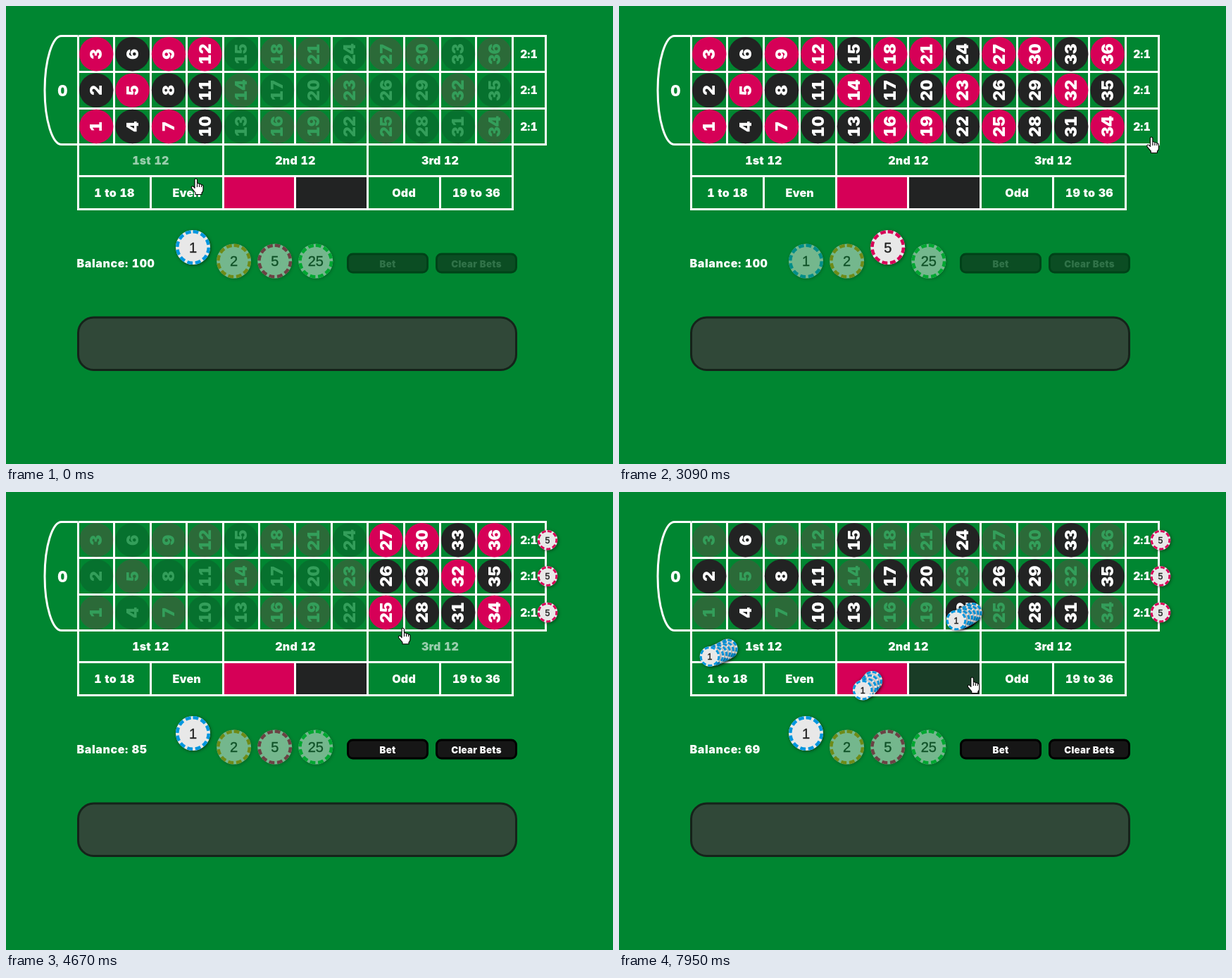
An HTML page for the animation above (8 s loop, 862 px wide and 650 px high).

```html
<!DOCTYPE html>
<html lang="en">
<head>
<meta charset="utf-8">
<title>Roulette table</title>
<style>
html, body { margin: 0; width: 100%; height: 100%; overflow: hidden; background: #008631; }
svg { display: block; width: 862px; height: 650px; }
text { fill: #fff; font-family: "Arial Black", Inter, "Open Sans", sans-serif; font-weight: 900;
  font-feature-settings: "tnum"; letter-spacing: .2px; }
.balance { letter-spacing: .6px; }
.chip { filter: drop-shadow(1px 1px 2px rgba(0, 0, 0, .5)); }
.chip text { fill: #222; stroke: #222; stroke-width: .4; letter-spacing: 0;
  font-family: "Liberation Sans", Arial, sans-serif; font-weight: 400; }
.line { fill: none; stroke: #fff; stroke-width: 3; }
.grid { shape-rendering: crispEdges; }
</style>
</head>
<body>
<svg id="stage" viewBox="0 0 862 650"></svg>
<script>
const LOOP = 8000, HOVER_LAG = 50, RISE = 120;
const RED = '#d60057', BLACK = '#222323';
const COLORS = { 1: '#0096df', 2: '#dc9100', 5: RED, 25: '#00c832' };
const LEFT = 102.5, TOP = 42.5, STEP = 51.4, RIGHT = LEFT + 12 * STEP;
const BOTTOM = 196.5, MIDDLE = 241.5, END = 288;
const DOZENS = ['1st', '2nd', '3rd'];
const SIDES = ['low', 'even', 'red', 'black', 'odd', 'high'];
const SIDE_TEXT = { low: '1 to 18', even: 'Even', odd: 'Odd', high: '19 to 36' };
const stage = document.getElementById('stage');

const isRed = n => n % 2 === ((n - 1) % 18 < 10 ? 1 : 0);
const colX = i => LEFT + i * STEP;
const rowY = r => 171 - r * STEP;
const trayX = i => 265.5 + 58.1 * i;
const scatter = i => Math.sin(i * 12.9 + 1) * 1.5;

function el(name, attrs = {}, parent = stage) {
  const node = document.createElementNS('http://www.w3.org/2000/svg', name);
  for (const key in attrs) node.setAttribute(key, attrs[key]);
  return parent.appendChild(node);
}
function label(str, x, y, size, parent = stage, attrs = {}) {
  const node = el('text', { x, y: y + size * .36, 'font-size': size, 'text-anchor': 'middle', ...attrs }, parent);
  node.textContent = str;
  return node;
}
function chip(value, x, y, r, parent, turn = 0) {
  const big = r > 20, w = big ? 4.5 : 3, ring = r - w / 2;
  const step = 2 * Math.PI * ring / (big ? 12 : 9);
  const g = el('g', { class: 'chip', transform: `translate(${x} ${y})` }, parent);
  el('circle', { r, fill: '#e8e8e8' }, g);
  el('circle', { r: ring, fill: 'none', stroke: COLORS[value], 'stroke-width': w,
    'stroke-dasharray': `${step * 2 / 3} ${step / 3}`, transform: `rotate(${turn - 90})` }, g);
  label(value, 0, 0, big ? 20 : 12.5, g);
  return g;
}

// Board: every zone is a group that reacts to the pointer
const zones = {}, numbers = [];
const zone = id => zones[id] = el('g');
for (const [id, fill] of [['red', RED], ['black', BLACK]]) {
  el('rect', { x: colX(2 * SIDES.indexOf(id)), y: MIDDLE, width: 2 * STEP, height: END - MIDDLE, fill }, zone(id));
}

let grid = `M${LEFT} ${MIDDLE}H${RIGHT}M${LEFT - 1.5} ${END}H${RIGHT + 1.5}M766.5 ${TOP - 1.5}V${BOTTOM + 1.5}`;
for (let r = 0; r <= 3; r++) grid += `M${LEFT} ${TOP + r * (BOTTOM - TOP) / 3}H768`;
for (let i = 0; i <= 12; i++) grid += `M${colX(i)} ${TOP}V${i % 4 === 0 ? END : BOTTOM}`;
for (let i = 2; i < 12; i += 4) grid += `M${colX(i)} ${MIDDLE}V${END}`;
el('path', { class: 'line grid', d: grid });
el('path', { class: 'line', d: `M${LEFT} ${TOP}H79A24 77 0 0 0 79 ${BOTTOM}H${LEFT}` });

for (let n = 1; n <= 36; n++) {
  const x = colX(Math.floor((n - 1) / 3)) + STEP / 2, y = rowY((n - 1) % 3), g = numbers[n] = el('g');
  el('circle', { cx: x, cy: y, r: 24.2, fill: isRed(n) ? RED : BLACK }, g);
  label(n, 0, 0, 23, g, { transform: `translate(${x} ${y}) rotate(-90)` });
}
label('0', 80.5, 120, 22);
for (let r = 0; r < 3; r++) label('2:1', 742.5, rowY(r), 15.5, zone('row' + r));
DOZENS.forEach((id, i) => label(id + ' 12', colX(4 * i + 2), 219.5, 16, zone(id)));
SIDES.forEach((id, i) => SIDE_TEXT[id] && label(SIDE_TEXT[id], colX(2 * i + 1), 265, 16, zone(id)));

// Numbers that stay lit while a zone is hovered
const covers = {
  low: n => n <= 18, high: n => n > 18, even: n => n % 2 === 0, odd: n => n % 2 === 1,
  red: isRed, black: n => !isRed(n)
};
for (let i = 0; i < 3; i++) {
  covers[DOZENS[i]] = n => Math.ceil(n / 12) === i + 1;
  covers['row' + i] = n => (n - 1) % 3 === i;
}
function zoneAt([x, y]) {
  const col = Math.floor((x - LEFT) / STEP);
  if (y < TOP || y > END || col < 0 || x > 767) return '';
  if (y < BOTTOM) return col > 11 ? 'row' + Math.floor((BOTTOM - y) / STEP) : '';
  if (col > 11) return '';
  return y < MIDDLE ? DOZENS[col >> 2] : SIDES[col >> 1];
}

// Controls
const balance = label('', 100.5, 365, 16, stage, { class: 'balance', 'text-anchor': 'start' });
const buttons = [['Bet', 542], ['Clear Bets', 668]].map(([str, x]) => {
  const g = el('g');
  el('rect', { x: x - 56.5, y: 352, width: 113, height: 26, rx: 7, fill: '#161616', stroke: '#000', 'stroke-width': 3 }, g);
  return { g, text: label(str, x, 366, 13.3, g) };
});
el('rect', { x: 102.5, y: 442, width: 622, height: 74.5, rx: 22, fill: '#304838', stroke: '#15231a', 'stroke-width': 3 });
const tray = Object.keys(COLORS).map((value, i) => ({ value: +value, x: trayX(i), g: chip(value, trayX(i), 362, 24.5) }));

// Bets: chips dropped at a steady pace, each a little further along the pile
const SPOT = { number: [500, 170], dozen: [153, 221.5], red: [358.5, 267] };
const bets = [];
function pile(parent, [x, y], [dx, dy], count, first, gap) {
  for (let i = 0; i < count; i++) {
    const drift = i < count - 1 ? scatter(i) : 0;
    const g = chip(1, x + dx * i + drift, y + dy * i + drift, 14.3, parent, i * 25);
    bets.push({ at: first + gap * i, value: 1, g });
  }
}
for (let r = 0; r < 3; r++) {
  bets.push({ at: 3240 + 255 * r, value: 5, g: chip(5, 769, rowY(r), 14.3, zones['row' + r]) });
}
pile(numbers[22], SPOT.number, [-4.2, 2.4], 6, 5390, 88);
pile(zones['1st'], SPOT.dozen, [-4.8, 2.4], 6, 6370, 135);
pile(zones.red, SPOT.red, [-4.1, 4.7], 4, 7350, 100);

// Pointer moves: leave, arrive, where to, tray chip picked there
const onTray = i => [trayX(i), 362];
const moves = [
  [-40, 0, [270, 245]], [60, 500, [430, 458]], [500, 800, [484, 421]],
  [980, 1520, onTray(1), 2], [1690, 1880, onTray(2), 5], [2060, 2250, onTray(3), 25], [2600, 2830, onTray(2), 5],
  [3040, 3100, [765, 182]], [3100, 3250, [750, 162]], [3370, 3490, [745, 118]], [3570, 3740, [739, 82]],
  [3780, 3990, [480, 400]], [3990, 4180, onTray(0), 1], [4200, 4610, [577, 198]],
  [4610, 5300, SPOT.number], [5830, 6370, SPOT.dozen], [6920, 7350, SPOT.red], [7700, 7960, [502, 263]]
];
const easeOut = k => 1 - (1 - Math.min(1, k)) ** 2;

function pointer(t) {
  let [x, y] = [268, 238];
  for (const [leave, arrive, [tx, ty]] of moves) {
    if (t <= leave) break;
    const p = easeOut((t - leave) / (arrive - leave));
    x += (tx - x) * p;
    y += (ty - y) * p;
  }
  return [x, y];
}
// How far a tray chip is raised, 0 to 1
function raised(value, t) {
  let up = value === 1 ? 1 : 0;
  for (const [, arrive, , pick] of moves) {
    const start = arrive - RISE;
    if (pick && t > start) up += ((pick === value ? 1 : 0) - up) * easeOut((t - start) / RISE);
  }
  return up;
}

const hand = el('g', { stroke: '#000', 'stroke-width': 1.1, fill: '#fff', 'stroke-linejoin': 'round' });
el('path', { d: 'M-2 1.5Q-2 0 -.5 0T1.5 1.5V7Q3.5 6 4.5 8Q6.5 7 7.5 9Q10 8.5 10 11V16Q10 19 8 20V22.5H-1V20L-6 14Q-7.5 11.5 -5.5 11T-2 13.5Z' }, hand);
el('path', { d: 'M1.5 7.5V12M4.5 8.5V12M7.5 9.5V12', fill: 'none' }, hand);
const arrow = el('path', { d: 'M0 0V16L3.7 12.5L6.2 18.5L8.7 17.4L6.2 11.7H11.5Z', fill: '#fff', stroke: '#000' });
const show = (node, on) => node.setAttribute('display', on ? 'inline' : 'none');
const within = (v, a, b) => v > a && v < b;

function draw(t) {
  const over = zoneAt(pointer(t - HOVER_LAG)), lit = covers[over];
  for (let n = 1; n <= 36; n++) numbers[n].setAttribute('opacity', !lit || lit(n) ? 1 : .2);
  for (const id in zones) {
    const dim = SIDE_TEXT[id] || !SIDES.includes(id) ? .6 : .75;
    zones[id].setAttribute('opacity', id === over ? dim : 1);
  }
  for (const c of tray) {
    const up = raised(c.value, t);
    c.g.setAttribute('transform', `translate(${c.x} ${362 - 19.5 * up})`);
    c.g.setAttribute('opacity', .5 + .5 * up);
  }
  let money = 100;
  for (const b of bets) {
    show(b.g, t >= b.at);
    if (t >= b.at) money -= b.value;
  }
  balance.textContent = 'Balance: ' + money;
  for (const b of buttons) {
    b.g.setAttribute('opacity', money < 100 ? 1 : .5);
    b.text.style.fill = money < 100 ? '#fff' : '#606060';
  }
  const [x, y] = pointer(t);
  const active = within(y, 41, 289) && within(x, 55, 768) || within(y, 318, 387) && within(x, 241, 465);
  show(hand, active);
  show(arrow, !active);
  for (const c of [hand, arrow]) c.setAttribute('transform', `translate(${x} ${y})`);
}

const start = performance.now();
function tick() {
  draw((performance.now() - start) % LOOP);
  requestAnimationFrame(tick);
}
draw(0);
requestAnimationFrame(tick);
</script>
</body>
</html>
```
